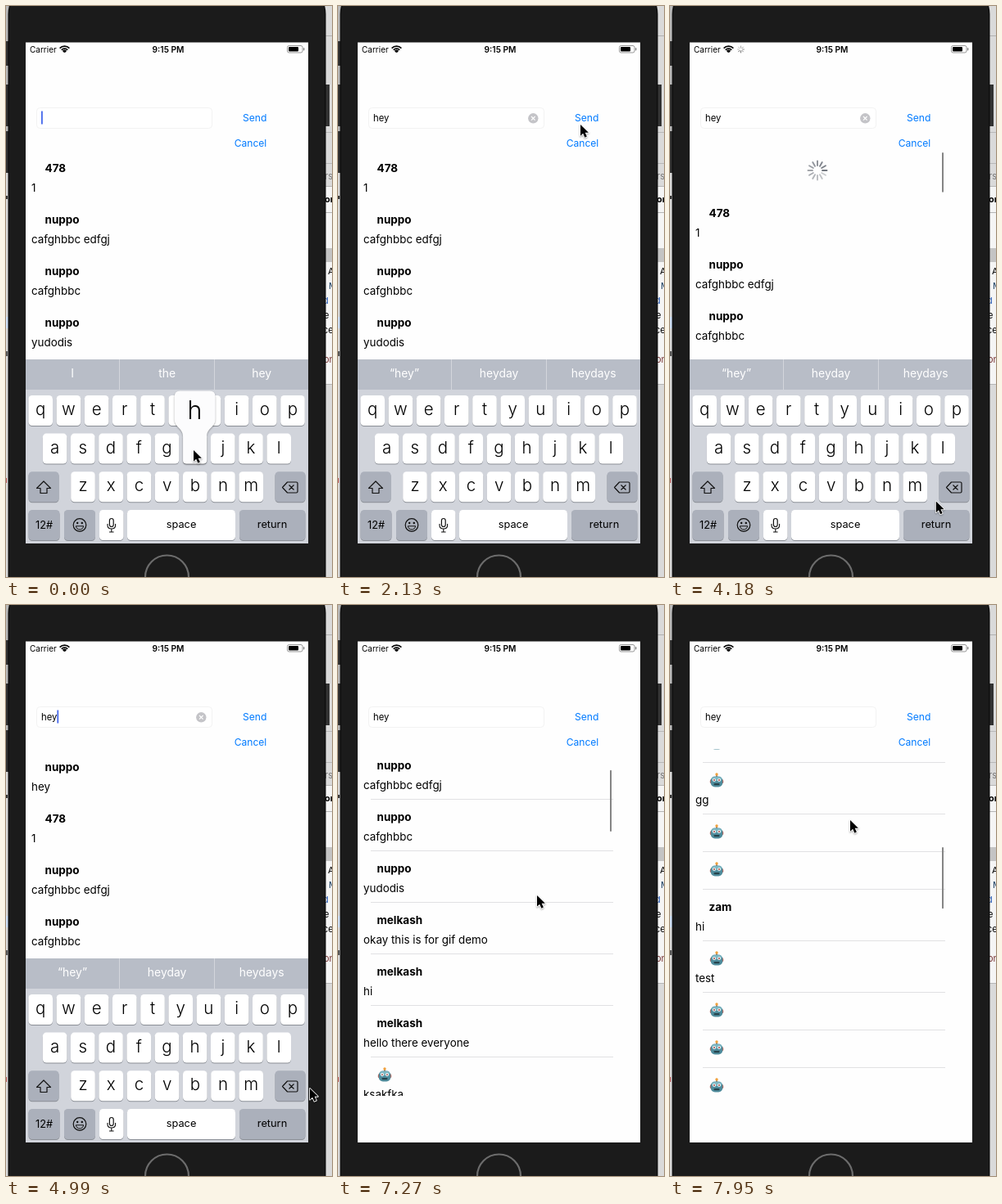
These frames come from a looping animation (398 by 698 pixels, 8 s). An HTML page with a canvas:

```html
<!DOCTYPE html>
<html lang="en">
<head>
<meta charset="utf-8">
<title>Message list demo</title>
<style>
html, body { margin: 0; width: 100%; height: 100%; overflow: hidden; background: #1b1b1b; }
canvas { display: block; }
</style>
</head>
<body>
<canvas id="stage" width="398" height="698"></canvas>
<script>
const ctx = document.getElementById('stage').getContext('2d');
const LOOP = 8000;
const SANS = 'Inter, "Open Sans", sans-serif';
const BLUE = '#007aff';
const SCREEN = [24, 44.5, 345, 612.5];
const LIST = { top: 176, bottom: 600, full: 2390 };

// Rows are [name, message]; a null name shows the robot.
const messages = [
  ['nuppo', 'hey'], ['478', '1'], ['nuppo', 'cafghbbc edfgj'], ['nuppo', 'cafghbbc'],
  ['nuppo', 'yudodis'], ['melkash', 'okay this is for gif demo'], ['melkash', 'hi'],
  ['melkash', 'hello there everyone'], [null, 'ksakfka'], [null, 'ok'], [null, ''],
  [null, 'gg'], [null, ''], [null, ''], ['zam', 'hi'], [null, 'test'],
  [null, ''], [null, ''], [null, ''], [null, '']
];

const typing = [
  { key: 'h', down: 0, up: 130 },
  { key: 'e', down: 600, up: 720 },
  { key: 'y', down: 1300, up: 1420 }
];
const suggestions = [
  ['I', 'the', 'hey'], ['“h”', 'he', 'how'], ['“he”', 'hey', 'hello'], ['“hey”', 'heyday', 'heydays']
];

// Motion tracks: [time, value, ...]
const pointerTrack = [
  [0, 229, 543], [180, 229, 543], [560, 112, 492], [880, 112, 492], [1280, 214, 494],
  [1480, 214, 494], [1770, 284, 186], [1950, 300, 160], [2130, 296, 145], [2240, 296, 142],
  [2650, 296, 142], [3170, 246, 218], [3230, 246, 219], [3500, 246, 219], [3710, 239, 611],
  [3900, 239, 612], [4290, 345, 604], [4600, 377, 618], [4990, 371, 591], [5110, 355, 600],
  [5250, 340, 624], [5900, 286, 177], [6420, 286, 177], [6860, 246, 482], [7030, 245, 480],
  [7270, 243, 355], [7420, 238, 300], [7600, 226, 272], [7940, 220, 263]
];
const pullTrack = [[3500, 0], [3710, 100], [3850, 112], [4000, 55], [4350, 55], [4750, 0]];
const scrollTrack = [[7000, 0], [7270, 127], [7400, 250], [7550, 400], [7780, 590], [7940, 660]];
const keyboardTrack = [[6270, 213], [6360, 226]];

const between = (t, a, b) => t >= a && t < b;
const clamp = v => Math.max(0, Math.min(1, v));
const smooth = u => u * u * (3 - 2 * u);
const linear = u => u;

function follow(track, t, ease = smooth) {
  if (t <= track[0][0]) return track[0].slice(1);
  for (let i = 1; i < track.length; i++) {
    const a = track[i - 1], b = track[i];
    if (t < b[0]) {
      const u = ease((t - a[0]) / (b[0] - a[0]));
      return a.slice(1).map((v, k) => v + (b[k + 1] - v) * u);
    }
  }
  return track[track.length - 1].slice(1);
}

function text(str, x, y, size, { color = '#000', weight = 400, align = 'left' } = {}) {
  ctx.font = `${weight} ${size}px ${SANS}`;
  ctx.fillStyle = color;
  ctx.textAlign = align;
  ctx.fillText(str, x, y);
}

function rect(x, y, w, h, color) {
  ctx.fillStyle = color;
  ctx.fillRect(x, y, w, h);
}

function box(x, y, w, h, r, color) {
  ctx.beginPath();
  ctx.roundRect(x, y, w, h, r);
  ctx.fillStyle = color;
  ctx.fill();
}

function dot(x, y, r, color) {
  ctx.beginPath();
  ctx.arc(x, y, r, 0, 7);
  ctx.fillStyle = color;
  ctx.fill();
}

function ring(x, y, r, color, width) {
  ctx.beginPath();
  ctx.arc(x, y, r, 0, 7);
  ctx.strokeStyle = color;
  ctx.lineWidth = width;
  ctx.stroke();
}

function stroke(d, color, width) {
  ctx.strokeStyle = color;
  ctx.lineWidth = width;
  ctx.stroke(new Path2D(d));
}

function spokes(x, y, inner, outer, count, shown, width, color, phase) {
  ctx.lineCap = 'round';
  ctx.lineWidth = width;
  ctx.strokeStyle = color;
  for (let i = 0; i < shown; i++) {
    const a = i / count * Math.PI * 2 - Math.PI / 2;
    ctx.globalAlpha = phase === null ? 1 : 0.35 + 0.65 * (((i - phase) % count + count) % count) / count;
    ctx.beginPath();
    ctx.moveTo(x + Math.cos(a) * inner, y + Math.sin(a) * inner);
    ctx.lineTo(x + Math.cos(a) * outer, y + Math.sin(a) * outer);
    ctx.stroke();
  }
  ctx.globalAlpha = 1;
  ctx.lineCap = 'butt';
}

function drawSurroundings() {
  rect(0, 0, 398, 698, '#dadada');
  rect(0, 0, 4, 204, '#b9b9b9');
  for (const [y, h] of [[43, 30], [96, 51], [153, 51]]) rect(0, y, 4, h, '#303030');
  rect(0, 380, 3, 14, '#cfe0f7');
  rect(0, 232, 2, 4, '#333');
  rect(0, 422, 2, 6, '#555');
  rect(0, 577, 1, 6, '#b55');
  rect(390, 36, 8, 1, '#b0b0b0');
  rect(390, 96, 5, 51, '#333');
  rect(390, 154, 8, 1, '#b8b8b8');
  rect(390, 192, 8, 1, '#b8b8b8');
  rect(390, 221, 8, 241, '#f5f5f5');
  for (const y of [220, 252, 462]) rect(390, y, 8, 1, '#b5b5b5');
  rect(390, 296, 8, 17, '#c4c4c4');
  text('rs', 389, 212, 11, { color: '#777' });
  text('or', 389, 240, 11, { weight: 700 });
  text('A', 393, 328, 11);
  text('M', 394, 346, 11, { color: '#246' });
  text('d', 387, 364, 11, { color: '#2559b5' });
  text('e', 388, 382, 11);
  text('ce', 387, 400, 11);
  text('on', 388, 436, 11, { color: '#733' });

  box(2.5, -30, 388, 800, 40, '#0e0e0e');
  box(4, -29, 385, 800, 39, '#1b1b1b');
  ring(196.5, 698, 26.5, '#6c6c6c', 2.2);
  rect(...SCREEN, '#fefefe');
}

function drawStatusBar(t) {
  text('Carrier', 29, 57, 10);
  text('9:15 PM', 198, 57, 10.2, { weight: 600, align: 'center' });
  for (const r of [9, 6, 3]) {
    ctx.beginPath();
    ctx.arc(71.5, 57.5, r - 0.7, -Math.PI * 0.75, -Math.PI * 0.25);
    ctx.strokeStyle = '#000';
    ctx.lineWidth = r === 3 ? 3 : 1.7;
    ctx.stroke();
  }
  if (between(t, 2560, 2950) || between(t, 3600, 4220)) {
    spokes(86.5, 53, 2, 4, 8, 8, 1, '#555', Math.floor(t / 90));
  }
  ctx.beginPath();
  ctx.roundRect(343.5, 48.5, 18.5, 8.5, 2);
  ctx.strokeStyle = '#8b8b8b';
  ctx.lineWidth = 0.9;
  ctx.stroke();
  box(345, 50, 12, 5.5, 1, '#000');
  box(363, 51, 1.4, 3.5, 0.7, '#8b8b8b');
}

function drawForm(t, typed) {
  const editing = t < 6270;
  ctx.beginPath();
  ctx.roundRect(37.5, 124.5, 214, 25, 4);
  ctx.fillStyle = '#fff';
  ctx.fill();
  ctx.strokeStyle = '#f2f2f2';
  ctx.lineWidth = 1;
  ctx.stroke();
  text(typed, 43, 140.5, 11.3);
  const caretX = 43 + ctx.measureText(typed).width;
  const caretOn = t < 2100 || (t - 2100) % 1000 >= 350;
  if (editing && caretOn) rect(caretX, 128.5, 1.8, 16, '#4669ec');
  if (editing && typed) {
    dot(238.3, 137.3, 6.2, '#c4c4c8');
    stroke('M236 135L240.6 139.6M240.6 135L236 139.6', '#fff', 1.2);
  }
  ctx.globalAlpha = between(t, 2420, 2600) ? 0.3 : 1;
  text('Send', 318.3, 141, 12.1, { color: BLUE, align: 'right' });
  ctx.globalAlpha = t < 6270 ? 1 : 0.75 + 0.25 * clamp((t - 6270) / 150);
  text('Cancel', 318.3, 172, 12.1, { color: BLUE, align: 'right' });
  ctx.globalAlpha = 1;
}

function drawRobot(x, y) {
  stroke(`M${x} ${y - 7}V${y - 3}`, '#8a6a55', 1.5);
  dot(x, y - 7, 1.7, '#f0a03c');
  box(x - 8.2, y - 1, 16.4, 5.5, 2, '#b9655a');
  box(x - 7.2, y - 4.5, 14.4, 13, 5, '#4f8c9c');
  box(x - 6, y - 4, 12, 5, 3, '#7cb6c2');
  for (const side of [-3, 3]) {
    dot(x + side, y, 2.1, '#e9f3f4');
    dot(x + side, y, 0.9, '#a33b35');
  }
  box(x - 3.5, y + 4, 7, 2.2, 1, '#26434c');
}

function drawList(t) {
  const pull = follow(pullTrack, t)[0];
  const scroll = follow(scrollTrack, t, linear)[0];
  const rows = t < 4200 ? messages.slice(1) : messages;
  const view = LIST.bottom - LIST.top;

  ctx.save();
  ctx.beginPath();
  ctx.rect(24, LIST.top, 345, view);
  ctx.clip();

  let y = LIST.top + pull - scroll;
  for (const [name, message] of rows) {
    const height = message ? 63 : 46;
    if (y > LIST.bottom) break;
    if (y + height >= LIST.top) {
      if (name) text(name, 47.5, y + 27, 13.5, { weight: 700 });
      else drawRobot(57, y + 22);
      text(message, 31, y + 51, 13.4);
      if (scroll > 0) rect(40, Math.round(y + height), 296, 1, '#e1e1e3');
    }
    y += height;
  }

  if (pull > 5) {
    const ready = t > 3680;
    const fade = t > 4350 ? clamp((4650 - t) / 300) : 1;
    const shown = ready ? 12 : Math.floor(clamp(pull / 90) * 12);
    const grow = 0.2 + 0.8 * fade;
    const phase = t > 3800 ? Math.floor(t / 80) : null;
    if (fade > 0) spokes(180, 201, 6 * grow, 11.5 * grow, 12, shown, 1.9, '#6a6f78', phase);
  }

  const barAlpha = scroll > 0 ? clamp((t - 7000) / 100) : t < 4750 ? clamp(pull / 20) : 0;
  if (barAlpha) {
    ctx.globalAlpha = barAlpha;
    const size = view * view / LIST.full - pull * 0.48;
    box(332, LIST.top + 3 + scroll * view / LIST.full, 2, size, 1, '#858585');
    ctx.globalAlpha = 1;
  }
  ctx.restore();
}

function keyCap(x, y, w, color = '#fff') {
  box(x, y + 1, w, 37, 4.5, '#8b8f96');
  box(x, y, w, 37, 4.5, color);
}

const keyRows = [
  { keys: 'q w e r t y u i o p', x: 42.2, y: 476 },
  { keys: 'a s d f g h j k l', x: 59.6, y: 522.6 },
  { keys: 'z x c v b n m', x: 94, y: 569.3 }
];

function drawPopup(x, y, letter) {
  ctx.save();
  ctx.shadowColor = 'rgba(0,0,0,.35)';
  ctx.shadowBlur = 2;
  ctx.shadowOffsetY = 1;
  ctx.fillStyle = '#fcfcfd';
  const top = y - 52, low = y + 37;
  ctx.fill(new Path2D(`M${x - 18} ${top}H${x + 18}Q${x + 25} ${top} ${x + 25} ${top + 7}V${top + 34}
    C${x + 25} ${top + 45} ${x + 14.5} ${top + 45} ${x + 14.5} ${top + 56}
    V${low - 4}Q${x + 14.5} ${low} ${x + 10} ${low}H${x - 10}Q${x - 14.5} ${low} ${x - 14.5} ${low - 4}
    V${top + 56}C${x - 14.5} ${top + 45} ${x - 25} ${top + 45} ${x - 25} ${top + 34}
    V${top + 7}Q${x - 25} ${top} ${x - 18} ${top}Z`));
  ctx.restore();
  text(letter, x, top + 34, 30.5, { align: 'center', weight: 300 });
}

function drawKeyboard(t, count) {
  const shift = t < 6270 ? 0 : follow(keyboardTrack, t)[0];
  if (shift >= 226) return;
  ctx.save();
  ctx.beginPath();
  ctx.rect(...SCREEN);
  ctx.clip();
  ctx.translate(0, shift);
  rect(24, 432, 345, 226, '#d1d4db');
  rect(24, 432, 345, 37, '#b8bdc7');
  for (const x of [138, 254]) rect(x, 432, 1, 37, '#d3d6dc');
  suggestions[count].forEach((word, i) =>
    text(word, 81 + i * 115.6, 454, 13.9, { color: '#fff', align: 'center' }));

  const held = typing.find(p => between(t, p.down, p.up));
  let popup = null;
  for (const row of keyRows) {
    row.keys.split(' ').forEach((letter, i) => {
      const x = row.x + i * 34.2;
      if (held && held.key === letter) popup = [x, row.y, letter];
      keyCap(x - 14.8, row.y, 29.6);
      text(letter, x, row.y + 24, 20.5, { align: 'center', weight: 350 });
    });
  }

  const gray = '#abb0bb';
  keyCap(27.5, 569.3, 37, gray);
  keyCap(328.5, 569.3, 37, gray);
  keyCap(27.5, 616, 38, gray);
  keyCap(71, 616, 38, gray);
  keyCap(114, 616, 29.5);
  keyCap(148, 616, 132);
  keyCap(285, 616, 80.5, gray);
  ctx.lineJoin = 'round';
  stroke('M46 581L54.5 589.5H50V595.5H42V589.5H37.5Z', '#111', 1.2);
  stroke('M343.5 582H354.5Q356 582 356 583.5V593.5Q356 595 354.5 595H343.5L337.5 588.5ZM345.5 585.5L351.5 591.5M351.5 585.5L345.5 591.5', '#111', 1.2);
  text('12#', 46.5, 639, 12.8, { align: 'center' });
  text('space', 214, 638, 12.8, { align: 'center' });
  text('return', 325, 638, 12.8, { align: 'center' });

  ring(90, 634.5, 7.8, '#111', 1.2);
  dot(87.2, 632, 1.2, '#111');
  dot(92.8, 632, 1.2, '#111');
  stroke('M85.3 635.8H94.7Q93.6 640 90 640Q86.4 640 85.3 635.8Z', '#111', 1);

  stroke('M126.4 629Q126.4 626.5 128.8 626.5Q131.2 626.5 131.2 629V634Q131.2 636.5 128.8 636.5Q126.4 636.5 126.4 634Z', '#111', 1.2);
  stroke('M124 633V635Q124 639 128.8 639Q133.6 639 133.6 635V633M128.8 639V643M126 643H131.6', '#111', 1.1);
  if (popup) drawPopup(...popup);
  ctx.restore();
}

function drawPointer(t) {
  const [x, y] = follow(pointerTrack, t);
  const arrow = new Path2D('M0 0V14.2L3.3 11.2L5.6 16.4L8.2 15.2L5.9 10.2H10.3Z');
  ctx.save();
  ctx.translate(x, y);
  ctx.scale(0.96, 0.96);
  ctx.shadowColor = 'rgba(0,0,0,.35)';
  ctx.shadowBlur = 2;
  ctx.shadowOffsetY = 1;
  ctx.lineJoin = 'round';
  ctx.lineWidth = 1.8;
  ctx.strokeStyle = '#fff';
  ctx.stroke(arrow);
  ctx.shadowColor = 'transparent';
  ctx.fillStyle = '#000';
  ctx.fill(arrow);
  ctx.restore();
}

function draw() {
  const t = performance.now() % LOOP;
  const done = typing.filter(p => t >= p.up);
  drawSurroundings();
  drawStatusBar(t);
  drawForm(t, done.map(p => p.key).join(''));
  drawList(t);
  drawKeyboard(t, done.length);
  drawPointer(t);
  requestAnimationFrame(draw);
}
draw();
</script>
</body>
</html>
```
